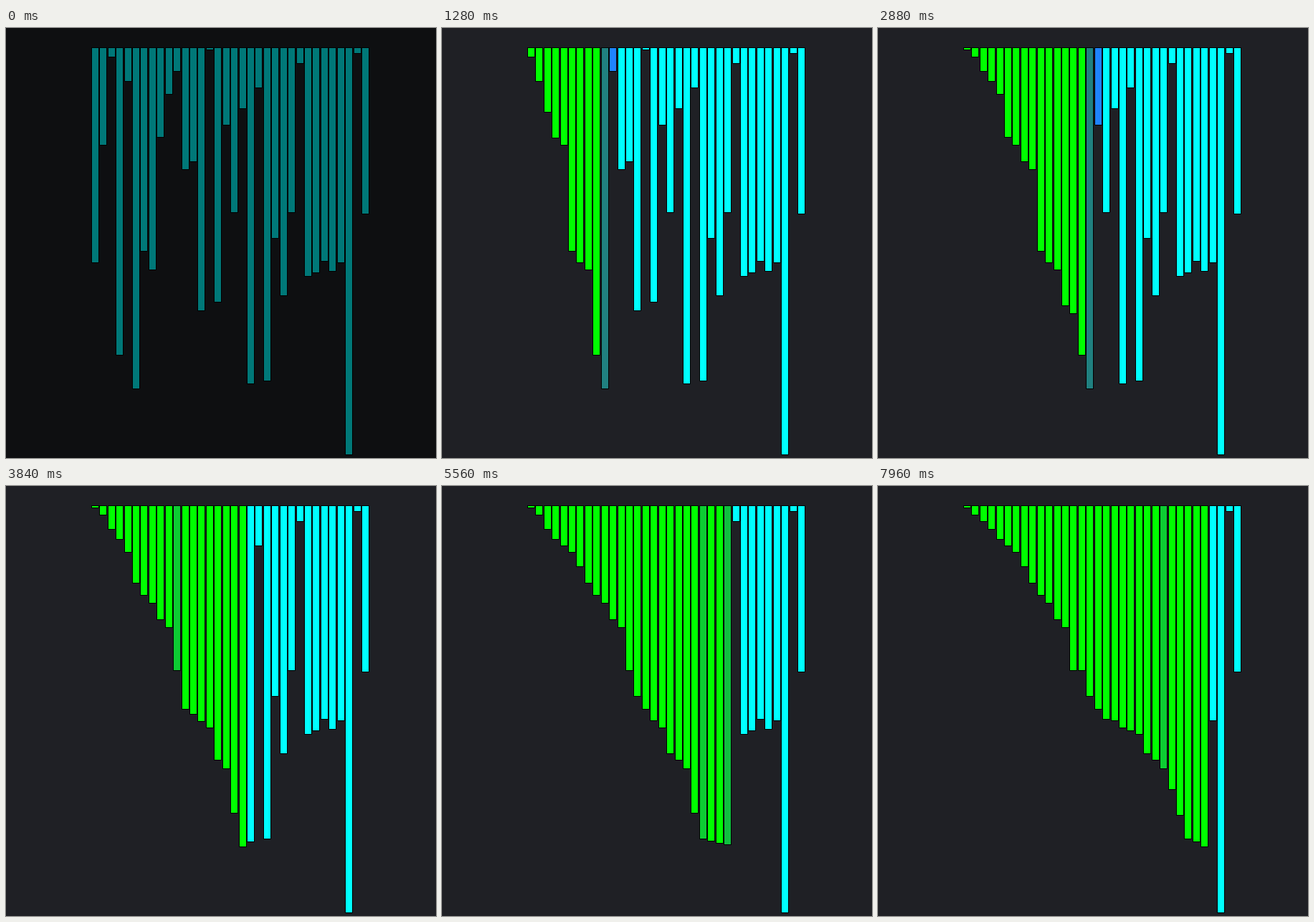
A matplotlib script for the animation above (8 s loop, 600 px wide and 600 px high).

```python
import numpy as np
import matplotlib.pyplot as plt
from matplotlib.animation import FuncAnimation
from matplotlib.patches import Rectangle

SIZE, FPS, LOOP = 600, 25, 8000
TOP, LEFT, PITCH, WIDTH = 27, 118.85, 400 / 35, 10
START, STEP = 110, 35.55    # ms: first write, time between writes
TWEEN = 93                  # ms for a bar to reach its new length
FADE_IN = 120               # ms left of the opening fade
PULSE = 67                  # ms for a picked bar to reach full highlight

CYAN = np.array([0, 1, 1])
GREEN = np.array([0, 1, 0])
VIOLET = np.array([0.25, 0, 1])
BACK = "#1f2025"

# The unsorted data, in pixels
VALUES = [300, 136, 13, 429, 47, 476, 284, 310, 125, 65, 33, 170,
          159, 367, 3, 355, 108, 230, 85, 469, 56, 465, 266, 346,
          230, 22, 319, 314, 298, 312, 300, 568, 8, 232]
N = len(VALUES)


def op_time(n):
    return START + n * STEP


def ease_out(t):
    return 1 - (1 - min(max(t, 0), 1)) ** 2


def length(i, t):
    value = VALUES[i]
    for start, a, b in moves[i]:
        if start > t:
            break
        value = a + (b - a) * ease_out((t - start) / TWEEN)
    return value


def insertion_sort():
    """Record when bars are written, picked and compared."""
    arr, n = VALUES[:], 0
    picked[0] = op_time(-2)

    def write(i, value):
        t = op_time(n)
        moves[i].append((t, length(i, t), value))
        arr[i] = value

    for i in range(1, N):
        picked[i] = op_time(n - 1)
        key, j = arr[i], i - 1
        while j >= 0 and arr[j] > key:
            level = 0.5 if i - j < 3 else 0.2
            compared[j].append((op_time(n), level))
            write(j + 1, arr[j])
            n += 1
            j -= 1
        write(j + 1, key)
        n += 1


moves = [[] for _ in range(N)]
compared = [[] for _ in range(N)]
picked = [0] * N
insertion_sort()


def color(i, t):
    age = t - picked[i]
    base = GREEN if age > PULSE else CYAN
    mix = max(0, 1 - abs(age - PULSE) / PULSE)
    for start, level in compared[i]:
        if -4 <= t - start < STEP - 4:
            mix = max(mix, level)
    return base + (VIOLET - base) * mix


fig = plt.figure(figsize=(6, 6), dpi=100, facecolor=BACK)
ax = fig.add_axes([0, 0, 1, 1])
ax.set_xlim(0, SIZE)
ax.set_ylim(SIZE, 0)
ax.axis("off")

bars = [ax.add_patch(Rectangle((LEFT + i * PITCH, TOP), WIDTH, v,
                               edgecolor="black", linewidth=0.72))
        for i, v in enumerate(VALUES)]
shade = ax.add_patch(Rectangle((0, 0), SIZE, SIZE, color="black",
                               linewidth=0, zorder=9))


def draw(frame):
    t = frame * 1000 / FPS
    for i, bar in enumerate(bars):
        bar.set_height(length(i, t))
        bar.set_facecolor(color(i, t))
    shade.set_alpha(0.53 * max(0, 1 - t / FADE_IN))
    return bars + [shade]


anim = FuncAnimation(fig, draw, frames=LOOP * FPS // 1000,
                     interval=1000 / FPS, repeat=True, repeat_delay=0)
plt.show()
```
